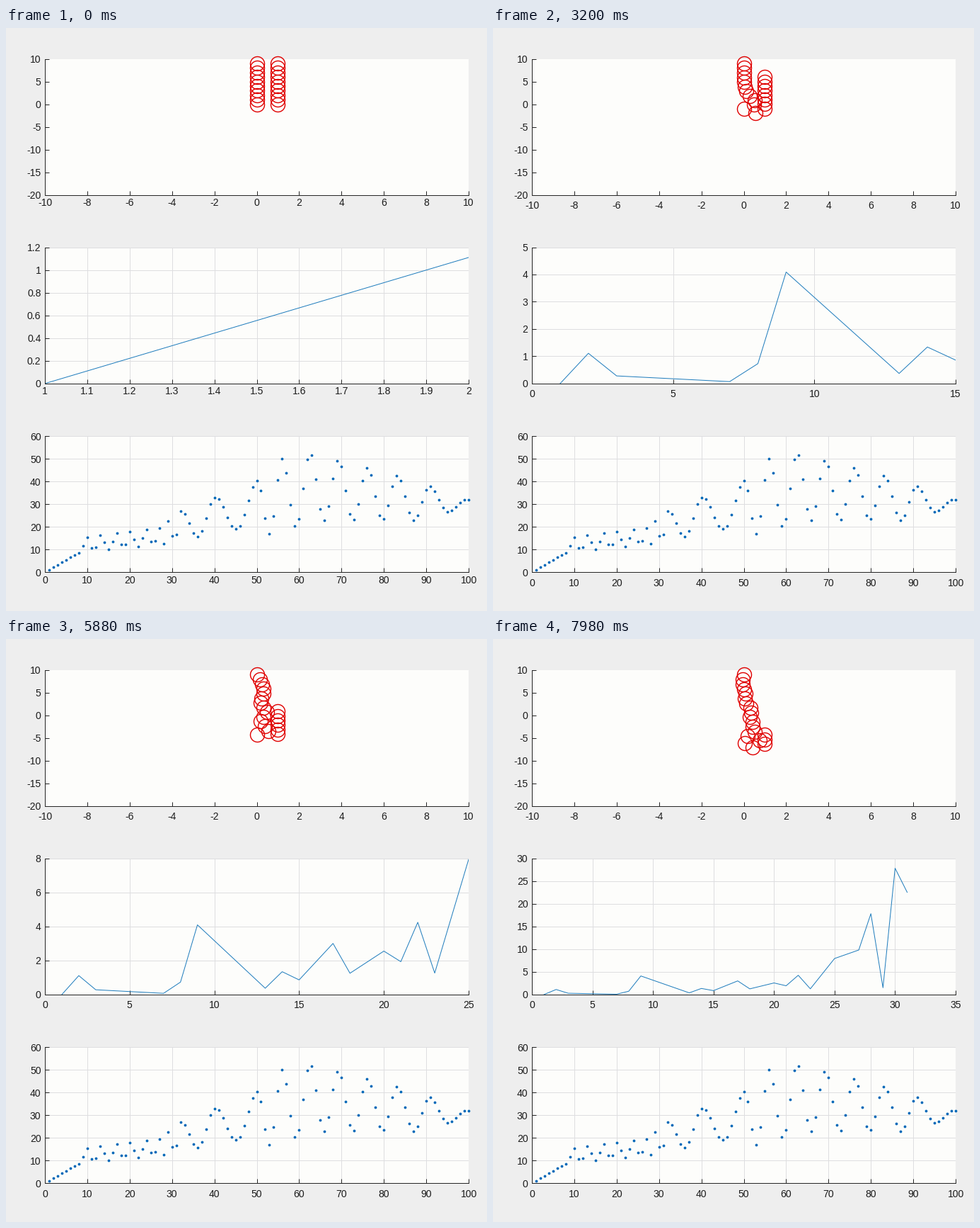
A matplotlib script that plays this animation: 680x823 px, repeating every 8 s.

```python
import numpy as np
import matplotlib.pyplot as plt
from matplotlib.animation import FuncAnimation

W, H, DPI = 680, 823, 100
PX = 72 / DPI
STEP, LOOP = 40, 8000
INK, BLUE, RED = "#262626", "#0068b8", "#e00000"

plt.rcParams.update({"font.family": "Liberation Sans", "font.size": 14 * PX,
                     "axes.unicode_minus": False, "axes.axisbelow": True})

BEADS, DT = 20, 0.01
STIFF, DAMP, FRICTION = 400, 4, 0.3
FALL_RATE = 0.183  # chain time per plotted point


def progress(t):
    """Points added to the curve by time t."""
    return np.interp(t, (0, 1700, 5880, 7980), (0, 8.6, 23.05, 29.8))


def simulate(steps):
    """Chain of unit springs, folded in two, pinned at its first bead."""
    half = BEADS // 2
    k = np.arange(BEADS)
    pos = np.column_stack([k >= half, np.where(k < half, half - 1 - k, k - half)])
    pos = pos.astype(float)
    vel = np.zeros_like(pos)
    path = [pos.copy()]
    for _ in range(steps):
        link, rel = np.diff(pos, axis=0), np.diff(vel, axis=0)
        size = np.linalg.norm(link, axis=1, keepdims=True)
        unit = link / size
        along = (rel * unit).sum(axis=1, keepdims=True)
        pull = (STIFF * (size - 1) + DAMP * along) * unit + FRICTION * rel
        acc = np.tile((0.0, -1.0), (BEADS, 1))
        acc[:-1] += pull
        acc[1:] -= pull
        vel += acc * DT
        vel[0] = 0
        pos += vel * DT
        path.append(pos.copy())
    return path


def chain_step(t):
    return int(FALL_RATE * progress(t) / DT)


path = simulate(chain_step(LOOP))


def through(x, *points):
    return np.interp(x, *zip(*points))


# Middle curve: straight runs between its turning points
index = np.arange(1, 32)
trace = through(index, (1, 0), (2, 1.11), (3, .28), (7, .07), (8, .73),
                (9, 4.09), (13, .37), (14, 1.34), (15, .86), (17, 3),
                (18, 1.25), (20, 2.55), (21, 1.93), (22, 4.24), (23, 1.26),
                (25, 7.93), (27, 9.8), (28, 17.8), (29, 1.5), (30, 27.8),
                (31, 22.5))

# Dots: a wave of uneven period swinging between two envelopes
days = np.arange(1, 101)
high = through(days, (0, 0), (8, 8.7), (10, 15.5), (27, 19.5), (32, 27),
               (50, 40.4), (56, 50), (63, 52.5), (83, 42.8), (100, 32))
low = through(days, (0, 0), (8, 8.7), (26, 12), (45, 19), (53, 17),
              (66, 23), (88, 23), (96, 27))
peaks = (0, 10, 13, 17, 20, 24, 27, 29, 32, 40, 50, 56, 62.6, 69.3, 76.2,
         83.2, 91, 100)
swing = np.cos(2 * np.pi * np.interp(days, peaks, np.arange(len(peaks))))
dots = low + (high - low) * (1 + swing) / 2


def x_scale(n):
    if n <= 10:
        return 1, n, .1 if n == 2 else .2 if n == 3 else .5 if n < 7 else 1
    step = 5 if n == 15 or n > 20 else 2
    return 0, step * int(np.ceil(n / step)), step


def y_scale(peak):
    for top, step in ((1.2, .2), (5, 1), (6, 2), (8, 2), (10, 2), (20, 5)):
        if peak <= top:
            return 0, top, step
    return 0, 30, 5


def ticks(lo, hi, step):
    v = np.round(np.arange(lo, hi + step / 2, step), 6)
    return v, [f"{q:g}" for q in v]


def scale(ax, xs, ys):
    ax.set_xticks(*ticks(*xs))
    ax.set_yticks(*ticks(*ys))
    ax.set_xlim(xs[:2])
    ax.set_ylim(ys[:2])


fig = plt.figure(figsize=(W / DPI, H / DPI), dpi=DPI, facecolor="#eeeeee")


def panel(bottom, grid=True):
    ax = fig.add_axes([55 / W, 1 - bottom / H, 599 / W, 192.4 / H],
                      facecolor="#fdfdfb")
    for side in ("top", "right"):
        ax.spines[side].set_visible(False)
    for side in ("left", "bottom"):
        ax.spines[side].set(color=INK, linewidth=PX)
    ax.tick_params(direction="in", length=6 * PX, width=PX, color=INK,
                   labelcolor="#1c1c1c")
    ax.tick_params(axis="y", pad=5.5 * PX)
    if grid:
        ax.grid(True, color="#dedee0", linewidth=PX)
    return ax


ax_chain = panel(235.9, grid=False)
ax_trace = panel(501.9)
ax_dots = panel(768.4)
axes = (ax_chain, ax_trace, ax_dots)

scale(ax_chain, (-10, 10, 2), (-20, 10, 5))
scale(ax_dots, (0, 100, 10), (0, 60, 10))

beads, = ax_chain.plot([], [], "o", ms=20 * PX, mfc="none", mec=RED,
                       mew=1.4 * PX, clip_on=False)
line, = ax_trace.plot([], [], color="#1f7dbd", lw=PX)
ax_dots.plot(days, dots, "o", ms=3.8 * PX, mec="none", color=BLUE,
             clip_on=False)


def draw(i):
    t = i * STEP
    beads.set_data(*path[chain_step(t)].T)
    n = 2 + int(progress(t))
    line.set_data(index[:n], trace[:n])
    scale(ax_trace, x_scale(n), y_scale(trace[:n].max()))
    for ax in axes:
        ax.tick_params(axis="x", pad=(4.5 if t < 840 else 8.5) * PX)
    return beads, line


anim = FuncAnimation(fig, draw, frames=LOOP // STEP, interval=STEP,
                     repeat=True, repeat_delay=0, blit=False)
plt.show()
```
